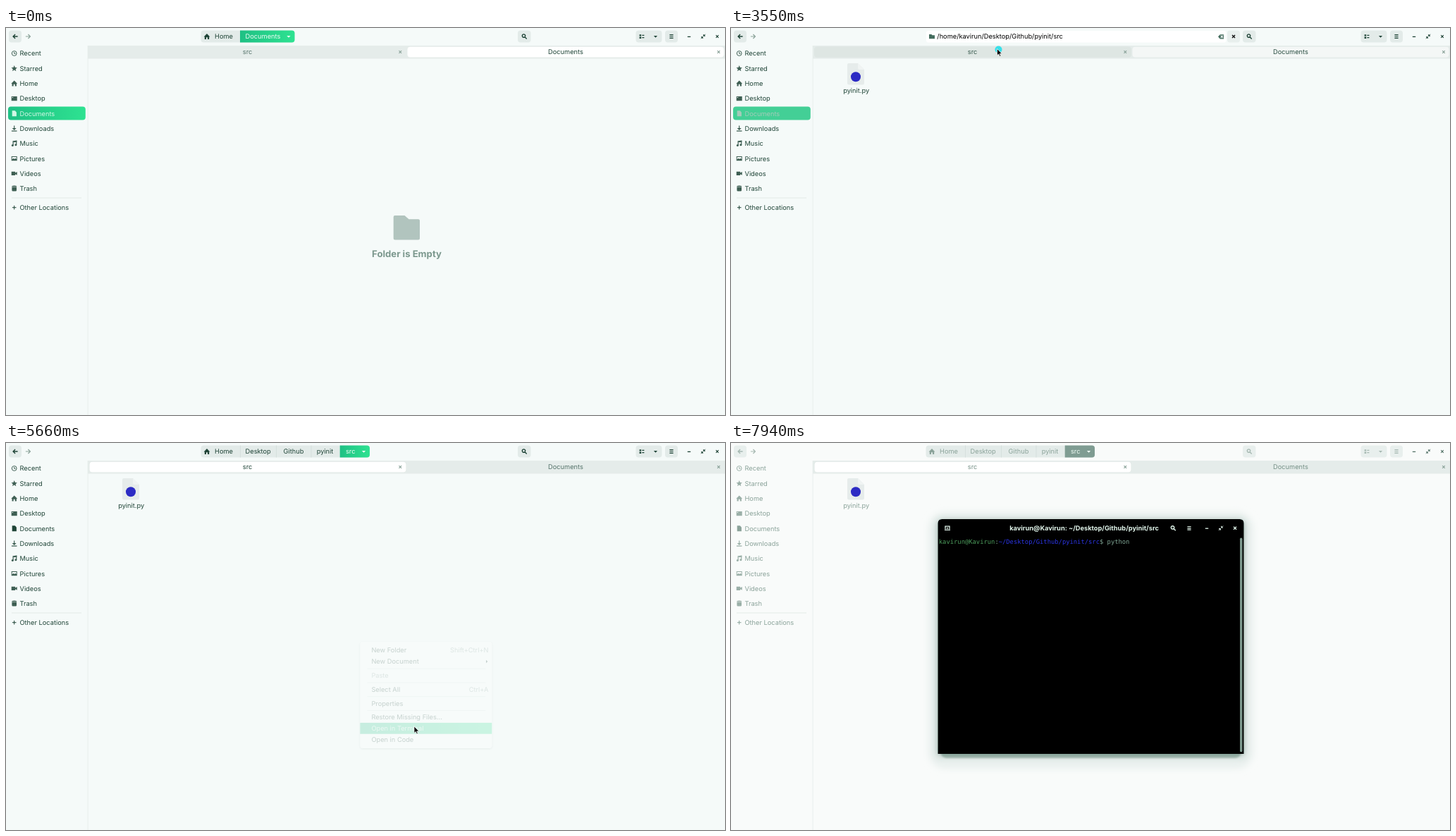
An HTML page that plays this animation: 1020x549 px, repeating every 8 s.

```html
<!DOCTYPE html>
<html lang="en">
<head>
<meta charset="utf-8">
<title>File manager</title>
<style>
  html, body { margin: 0; width: 100%; height: 100%; overflow: hidden; background: #f5faf9; }
  svg { display: block; width: 1020px; height: 549px; font: 9.25px Inter, sans-serif; text-rendering: geometricPrecision; }
  text { fill: currentColor; white-space: pre; }
  .mid { text-anchor: middle; }
  .end { text-anchor: end; }
  .bold { font-weight: 700; }
  .mono { font: 8.82px "DejaVu Sans Mono", monospace; }
</style>
</head>
<body>
<svg id="stage" viewBox="0 0 1020 549"></svg>
<script>
const LOOP = 8000;
const FG = '#1f4437', ICON = '#446d5e', DIM = '#8ba39a', MINT = '#d2f7e5';
const USER = 'kavirun', HOST = 'Kavirun', SRC = 'Desktop/Github/pyinit/src';

const clamp = v => Math.max(0, Math.min(1, v));
const ramp = (t, a, b) => clamp((t - a) / (b - a));
const within = (t, a, b) => t >= a && t < b;
const rgb = hex => [1, 3, 5].map(i => parseInt(hex.slice(i, i + 2), 16));
const mix = (a, b, k) => {
  const to = rgb(b);
  return `rgb(${rgb(a).map((v, i) => Math.round(v + (to[i] - v) * k))})`;
};

// Markup helpers
const txt = (x, y, s, attrs = '') => `<text x="${x}" y="${y + 3.4}" ${attrs}>${s}</text>`;
const mid = (x, y, s, attrs = '') => txt(x, y, s, `class="mid" ${attrs}`);
const box = (x, y, w, h, r, fill, attrs = '') =>
  `<rect x="${x}" y="${y}" width="${w}" height="${h}" rx="${r}" fill="${fill}" ${attrs}/>`;
const group = (id, body, attrs = '') => `<g id="${id}" ${attrs}>${body}</g>`;
const solid = d => `<path fill="currentColor" fill-rule="evenodd" d="${d}"/>`;
const line = (d, w = 1.2) => `<path fill="none" stroke="currentColor" stroke-width="${w}" d="${d}"/>`;

// Icons are drawn around their own centre
const icons = {
  recent: line('M3.4 0A3.4 3.4 0 1 1-3.4 0A3.4 3.4 0 1 1 3.4 0M0-2V.3H1.8', 1),
  star: solid('M0-4.2L1.2-1.3 4.2-1.1 1.9.9 2.6 3.9 0 2.3-2.6 3.9-1.9.9-4.2-1.1-1.2-1.3z'),
  home: solid('M-4.4.4L0-4 4.4.4H3.2V4H1V1.2H-1V4H-3.2V.4z'),
  desktop: solid('M-4-3H4V3.4H-4zM-3-2V-.8H-1.6V-2z'),
  file: solid('M-3-4H1L3.2-1.6V4H-3z'),
  download: line('M0-4V1.2M-3.8 3.7H3.8') + solid('M-3-.6H3L0 2.6z'),
  music: line('M-1.6 2.6V-3L3-3.6V1.8', 1.2) + solid('M-1-3.6L3.6-4V-2L-1-1.6z') +
    '<g fill="currentColor"><circle cx="-2.4" cy="2.6" r="1.5"/><circle cx="2.2" cy="1.9" r="1.5"/></g>',
  picture: solid('M-4-3.2H4V3.2H-4zM-3-2.2V1.4L-1-.4.4.8 1.8-.4 3 .8V-2.2z'),
  video: solid('M-4-2.6H1.4V-.8L4-2.4V2.4L1.4.8V2.6H-4z'),
  trash: solid('M-3-3.6Q0-4.6 3-3.6L3.6-2.2H-3.6zM-3.3-1.6H3.3V2.6Q3.3 3.8 2 3.8H-2Q-3.3 3.8-3.3 2.6z'),
  plus: line('M-2.8 0H2.8M0-2.8V2.8', 1),
  back: line('M3.6 0H-2.6M.1-3L-2.9 0 .1 3', 1.4),
  forward: line('M-3.6 0H2.6M-.1-3L2.9 0-.1 3', 1.2),
  search: line('M1.4-.9A2.2 2.2 0 1 1-3-.9A2.2 2.2 0 1 1 1.4-.9M.8.8L3.4 3.4', 1.4),
  down: solid('M-2.6-1.2H2.6L0 1.5z'),
  right: solid('M-1-2.3L1.4 0-1 2.3z'),
  list: solid('M-3.4-2.8H-.8V-.5H-3.4zM-3.4.6H-.8V2.9H-3.4z') + line('M.4-1.7H3.4M.4 1.7H3.4', 1.3),
  menu: line('M-2.6-2.3H2.6M-2.6 0H2.6M-2.6 2.3H2.6', 1.2),
  minimise: line('M-2.2.4H2.2', 1.3),
  restore: line('M.8-3V-.8H3M-.8 3V.8H-3', 1.2) + line('M.8-.8L3.2-3.2M-.8.8L-3.2 3.2', .8),
  close: line('M-2-2L2 2M2-2L-2 2', 1.3),
  folder: solid('M-4-3H-.6L.6-1.8H4V3.2H-4z'),
  erase: solid('M-4 0L-1.2-3.1H4V3.1H-1.2zM-.7-1.4L.7 0-.7 1.4.1 2.1 1.4.7 2.7 2.1 3.4 1.4 2.1 0 3.4-1.4 2.7-2.1 1.4-.7.1-2.1z'),
  tab: line('M-3 1.4V-2.6H3V1.4M-4 2.6H4', 1.3) + line('M0-1.2V1.4M-1.3.1H1.3', .9)
};
const icon = (name, x, y, color = 'currentColor', k = 1) =>
  `<g transform="translate(${x} ${y}) scale(${k})" style="color:${color}">${icons[name]}</g>`;

const places = [['recent', 'Recent'], ['star', 'Starred'], ['home', 'Home'], ['desktop', 'Desktop'],
  ['file', 'Documents'], ['download', 'Downloads'], ['music', 'Music'], ['picture', 'Pictures'],
  ['video', 'Videos'], ['trash', 'Trash']];

function place([name, label], i) {
  const y = 36 + i * 21.3;
  if (label === 'Documents') {
    return box(3, y - 9.6, 109.8, 19, 4, 'url(#accent)', 'id="placeMark"') +
      group('placeDocs', icon(name, 11.7, y) + txt(19.5, y, label));
  }
  return `<g opacity=".85">${icon(name, 11.7, y)}</g>` + txt(19.5, y, label);
}

const sidebar = places.map(place).join('') + box(8, 240.5, 99, 1, 0, '#e3ebe8') +
  icon('plus', 11.7, 254.7) + txt(19.5, 254.7, 'Other Locations');

// Path bar: [label, centre, left edge]; the last part is the current folder
function crumbs(id, parts, right) {
  const [last, centre, left] = parts[parts.length - 1];
  const rest = parts.slice(0, -1);
  return group(id,
    box(276.5, 3.5, right - 276.5, 17, 4, '#e3ebe9') + icon('home', 285, 12) +
    rest.map(([s, x, l], i) => (i ? box(l, 3.5, 1, 17, 0, '#d6e0dd') : '') + mid(x, 12, s)).join('') +
    `<path class="here" fill="url(#accent)" d="M${left} 3.5H${right - 4}q4 0 4 4v9q0 4-4 4H${left}z"/>` +
    `<g style="color:#effcf5">${mid(centre, 12, last)}${icon('down', right - 8.5, 12.3)}</g>`);
}

const entry = group('entry',
  box(277, 4, 425.5, 16.5, 3, '#fff') +
  box(277.2, 4.2, 425, 16, 2.5, 'none', 'id="focusRing" stroke="#27c98c" stroke-width="1.6"') +
  box(292.5, 6.3, 0, 11.8, 0, '#bfe9d8', 'id="selection"') +
  icon('folder', 285, 12, ICON) + txt(292.3, 12, '', 'id="path"') + icon('erase', 695, 12.3, ICON) +
  box(704, 3.5, 18, 17, 4, '#e8efed') + icon('close', 713, 12));

const header = box(4, 3.5, 18, 17, 4, '#e3ebe9') + box(726, 3.5, 18.5, 17, 4, '#e3ebe9') +
  box(893.5, 3.5, 37, 17, 4, '#e3ebe9') + box(935, 3.5, 18, 17, 4, '#e3ebe9') +
  icon('back', 13, 12) + icon('forward', 31.5, 12, DIM) + icon('search', 735.3, 12) +
  icon('list', 902, 12) + icon('down', 921.5, 12.3) + icon('menu', 944, 12);

const windowButtons = icon('minimise', 969, 12) + icon('restore', 989, 12) + icon('close', 1009, 12, '', .9);

const tabs = box(116, 25, 904, 18.5, 0, '#e5ecea') +
  box(118, 26.5, 450, 15.2, 4, '#dee6e3', 'id="tabHover"') +
  box(118.5, 26.8, 449, 14.6, 4, '#fff', 'id="tabSrc"') +
  box(569.5, 26.8, 449, 14.6, 4, '#fff', 'id="tabDocs"') +
  mid(342.5, 34, 'src', 'id="srcLabel"') + mid(794, 34, 'Documents', 'id="docsLabel"') +
  icon('close', 559.3, 34, DIM, .9) + icon('close', 1011, 34, DIM, .9);

const empty = group('empty',
  '<path fill="#b1c4be" d="M549.7 268q0-2 2-2H565.5l6 5.3H585q2 0 2 2v25.2q0 2-2 2H551.700q-2 0-2-2z"/>' +
  mid(568.5, 322, 'Folder is Empty', 'style="font-weight:700;font-size:13.15px;color:#7c988e"'));

const pyFile = group('pyFile',
  '<path fill="#e6eceb" d="M167 50H180L189 59V78q0 2.500-2.500 2.500H167.500q-2.500 0-2.500-2.500V52q0-2 2-2z"/>' +
  '<path fill="#f0f4f3" d="M180 50L189 59H182q-2 0-2-2z"/>' +
  '<circle cx="177" cy="69.3" r="7" fill="#2c2bc4"/>' + mid(177.7, 88.3, 'pyinit.py'));

// Popup menus: rows are [centre y, label, shortcut, disabled]
const menus = {
  edit: { x: 391, y: 7.5, w: 84, h: 110, tx: 407.3, seps: [78],
    rows: [[18.5, 'Cut'], [34.5, 'Copy'], [50.5, 'Paste'], [66.5, 'Delete'], [89.5, 'Select All'], [105.5, 'Insert Emoji']] },
  folder: { x: 502.3, y: 282, w: 187, h: 151, tx: 518.4, seps: [319.7, 339.5, 359.2, 379],
    rows: [[294, 'New Folder', 'Shift+Ctrl+N'], [310, 'New Document', '>'], [329.7, 'Paste', '', 1],
      [349.5, 'Select All', 'Ctrl+A'], [369.2, 'Properties'], [388.7, 'Restore Missing Files...'],
      [404.8, 'Open in Terminal'], [420.8, 'Open in Code']] }
};
function popup(id, m) {
  const tail = (y, s) => s === '>' ? icon('right', 682, y) : txt(684.5, y, s, `class="end" style="color:${DIM}"`);
  return group(id, box(m.x, m.y, m.w, m.h, 4, '#fff', 'filter="url(#lift)"') +
    m.seps.map(y => box(m.x + 10, y, m.w - 19, 1, 0, '#e2e9e7')).join('') +
    box(m.x, 0, m.w, 15.8, 0, 'url(#accent)', 'class="hover"') +
    m.rows.map(([y, s, key, off]) =>
      `<g class="row" style="color:${off ? DIM : FG}">${txt(m.tx, y, s)}${key ? tail(y, key) : ''}</g>`).join(''));
}

const terminal = group('terminal',
  box(280, 98, 461, 364, 24, '#e9f0ee', 'filter="url(#blur)"') +
  box(297, 420, 427, 27, 9, '#aabfb7', 'filter="url(#soft)"') +
  '<path filter="url(#glow)" d="M293.500 441V114q0-6 6-6H721.500q6 0 6 6V441z"/>' +
  `<g style="color:#e2f6ec">${icon('tab', 307, 120.8)}${icon('search', 627.3, 120.8)}${icon('menu', 650, 120.8)}` +
  icon('minimise', 675, 120.8) + icon('restore', 695, 120.8) + icon('close', 715, 120.8) +
  txt(501, 120.6, `${USER}@${HOST}: ~/${SRC}`, 'class="mid bold"') + '</g>' +
  box(722, 134.5, 3.4, 304, 1.7, '#7c998e') +
  `<text class="mono" x="294.8" y="143" style="color:#7fa594"><tspan fill="#4c9c5c">${USER}@${HOST}</tspan>:` +
  `<tspan fill="#2b35e6">~/${SRC}</tspan>$ <tspan id="typed"></tspan></text>` +
  box(534, 133.2, 5.3, 13.4, 0, '#6d8d80', 'id="block"'));

const pointer = group('click', '<circle r="5" cy="1" cx="2" fill="#38e0ea"/>') +
  group('arrow', '<path d="M0 0V9.400L2.200 7.400 3.800 10.800 5.300 10.100 3.800 6.900H6.800z" stroke="#fff" stroke-width=".7"/>') +
  group('beam', '<path d="M575 374.500h1.500l.8.700.800-.700h1.500M577.300 375v8.500M575 384.200h1.500l.8-.7.800.7h1.500" fill="none" stroke="#cfd8d4" stroke-width="1.100"/>');

const filter = (id, body) => `<filter id="${id}" x="-20%" y="-20%" width="140%" height="140%">${body}</filter>`;
const stage = document.getElementById('stage');
stage.innerHTML = '<defs><linearGradient id="accent"><stop stop-color="#1fc084"/><stop offset="1" stop-color="#2ee291"/></linearGradient>' +
  filter('lift', '<feDropShadow dx="0" dy="1" stdDeviation="1.6" flood-color="#1f4437" flood-opacity=".32"/>') +
  filter('glow', '<feDropShadow dx="0" dy="2" stdDeviation="5" flood-color="#3f6b5b" flood-opacity=".5"/>') +
  filter('blur', '<feGaussianBlur stdDeviation="5"/>') + filter('soft', '<feGaussianBlur stdDeviation="1"/>') + '</defs>' +
  box(0, 0, 1020, 549, 0, '#f5faf9', 'id="page"') +
  box(115.6, 25, 1, 524, 0, '#e9efed') +
  group('sidebar', sidebar) + group('header', header) + group('windowButtons', windowButtons) +
  group('pathBar', crumbs('docsPath', [['Home', 309, 276], ['Documents', 364.5, 332]], 409.5) +
    crumbs('srcPath', [['Home', 309, 276], ['Desktop', 357.7, 332], ['Github', 408, 383], ['pyinit', 452.5, 432.5], ['src', 488.7, 473.7]], 516)) +
  entry + tabs + empty + pyFile + popup('edit', menus.edit) + popup('folder', menus.folder) + terminal + pointer;

const el = {};
stage.querySelectorAll('[id]').forEach(node => { el[node.id] = node; });
const show = (id, v) => el[id].setAttribute('opacity', +v);
const set = (id, name, v) => el[id].setAttribute(name, v);
const tint = (id, color) => { el[id].style.color = color; };

// Pointer route as [time, x, y]
const route = [[1310, 391, 8], [1500, 391, 8], [2100, 413, 19], [2150, 415, 21], [2380, 424.5, 33.5], [3300, 424.5, 33.5],
  [3549, 377.5, 29.5], [4000, 377.5, 29.5], [4001, 502, 283], [4300, 502, 283], [4700, 580.8, 390], [4890, 579, 402]];
const clicks = [[1310, 200], [2940, 180], [3550, 210], [4210, 180], [5290, 180]];
const keys = [6710, 6910, 7120, 7190, 7410, 7410];

function pointerAt(t) {
  const i = route.findIndex(k => k[0] > t);
  if (i < 1) return (i ? route[route.length - 1] : route[0]).slice(1);
  const [a, b] = [route[i - 1], route[i]], k = ramp(t, a[0], b[0]);
  return [a[1] + (b[1] - a[1]) * k, a[2] + (b[2] - a[2]) * k];
}

function drawMenu(id, opacity, y) {
  const { rows } = menus[id], hit = rows.findIndex(r => Math.abs(r[0] - y) <= 8 && !r[3]);
  const hover = el[id].querySelector('.hover');
  show(id, opacity);
  hover.setAttribute('opacity', hit < 0 ? 0 : 1);
  if (hit >= 0) hover.setAttribute('y', rows[hit][0] - 7.9);
  el[id].querySelectorAll('.row').forEach((row, i) => {
    row.style.color = i === hit ? MINT : rows[i][3] ? DIM : FG;
  });
}

function drawPath(t) {
  const inSrc = t >= 3550, editing = within(t, 500, 3690);
  const text = `/home/${USER}/${inSrc ? SRC : 'Documents'}`;
  if (el.path.textContent !== text) el.path.textContent = text;
  show('entry', editing);
  show('docsPath', t < 500);
  show('srcPath', t >= 3690);
  show('focusRing', t < 1310 ? [.4, .75, 1][Math.min(2, Math.floor((t - 500) / 70))] || 0
    : t < 3100 ? 1 - ramp(t, 1310, 1500) : inSrc ? 0 : ramp(t, 3100, 3390));
  show('selection', !inSrc);
  if (editing) set('selection', 'width', el.path.getComputedTextLength());
}

function drawTabs(t) {
  const k = t < 3550 ? 0 : ramp(t, 3470, 3890);
  show('tabHover', t >= 3550);
  show('tabSrc', t < 3560 ? 0 : ramp(t, 3580, 3890));
  show('tabDocs', clamp(1 - 2.2 * k));
  tint('srcLabel', mix('#55736a', FG, clamp(3 * k)));
  tint('docsLabel', mix(FG, '#55736a', k));
  show('placeMark', 1 - k * .6 - .4 * (k === 1));
  set('placeMark', 'fill', k ? '#2cca8a' : 'url(#accent)');
  tint('placeDocs', mix(MINT, FG, clamp(k * 1.3)));
  show('empty', t < 3550);
  show('pyFile', t >= 3550);
}

// The file window loses focus when the terminal opens
function drawFocus(t) {
  const step = t < 5860 ? 0 : Math.min(3, 1 + Math.floor((t - 5860) / 80));
  const slow = [0, 0, .5, 1][step], fast = [0, .6, .85, 1][step];
  for (const id of ['sidebar', 'header']) tint(id, mix(FG, DIM, slow));
  if (t >= 3950) tint('placeDocs', mix(FG, DIM, slow));
  if (step) ['srcLabel', 'docsLabel'].forEach(id => tint(id, mix(FG, DIM, slow * .8)));
  tint('windowButtons', mix(FG, DIM, slow * .5));
  for (const id of ['pathBar', 'pyFile']) tint(id, mix(FG, DIM, fast));
  set('page', 'fill', mix('#f5faf9', '#f9fbfa', fast));
  el.srcPath.querySelector('.here').setAttribute('fill', ['url(#accent)', '#62dfaa', '#71bf9d', '#7f9c92'][step]);
  show('header', 1 - .25 * slow);

  const scale = [1, .984, .996, 1][step];
  show('terminal', step > 0);
  set('terminal', 'transform', `translate(510.5 460) scale(${scale}) translate(-510.5 -460)`);
  const count = keys.filter(k => t >= k).length;
  el.typed.textContent = 'python'.slice(0, count);
  set('block', 'x', 534 + count * 5.31);
  show('block', t < 6290 || within(t, 6710, 7940));
  show('beam', within(t, 5860, 6770));
}

function draw(t) {
  const [x, y] = pointerAt(t);
  drawPath(t);
  drawTabs(t);
  drawFocus(t);
  drawMenu('edit', ramp(t, 1290, 1450) * (1 - ramp(t, 3000, 3140)), y);
  drawMenu('folder', ramp(t, 4190, 4340) * (1 - ramp(t, 5480, 5710)), y);
  show('arrow', [[1310, 3140], [3550, 3950], [4210, 5710]].some(([a, b]) => within(t, a, b)));
  set('arrow', 'transform', `translate(${x} ${y})`);
  show('click', clicks.some(([at, span]) => within(t, at, at + span)));
  set('click', 'transform', `translate(${x} ${y})`);
}

const start = performance.now();
function tick() {
  draw((performance.now() - start) % LOOP);
  requestAnimationFrame(tick);
}
tick();
</script>
</body>
</html>
```
